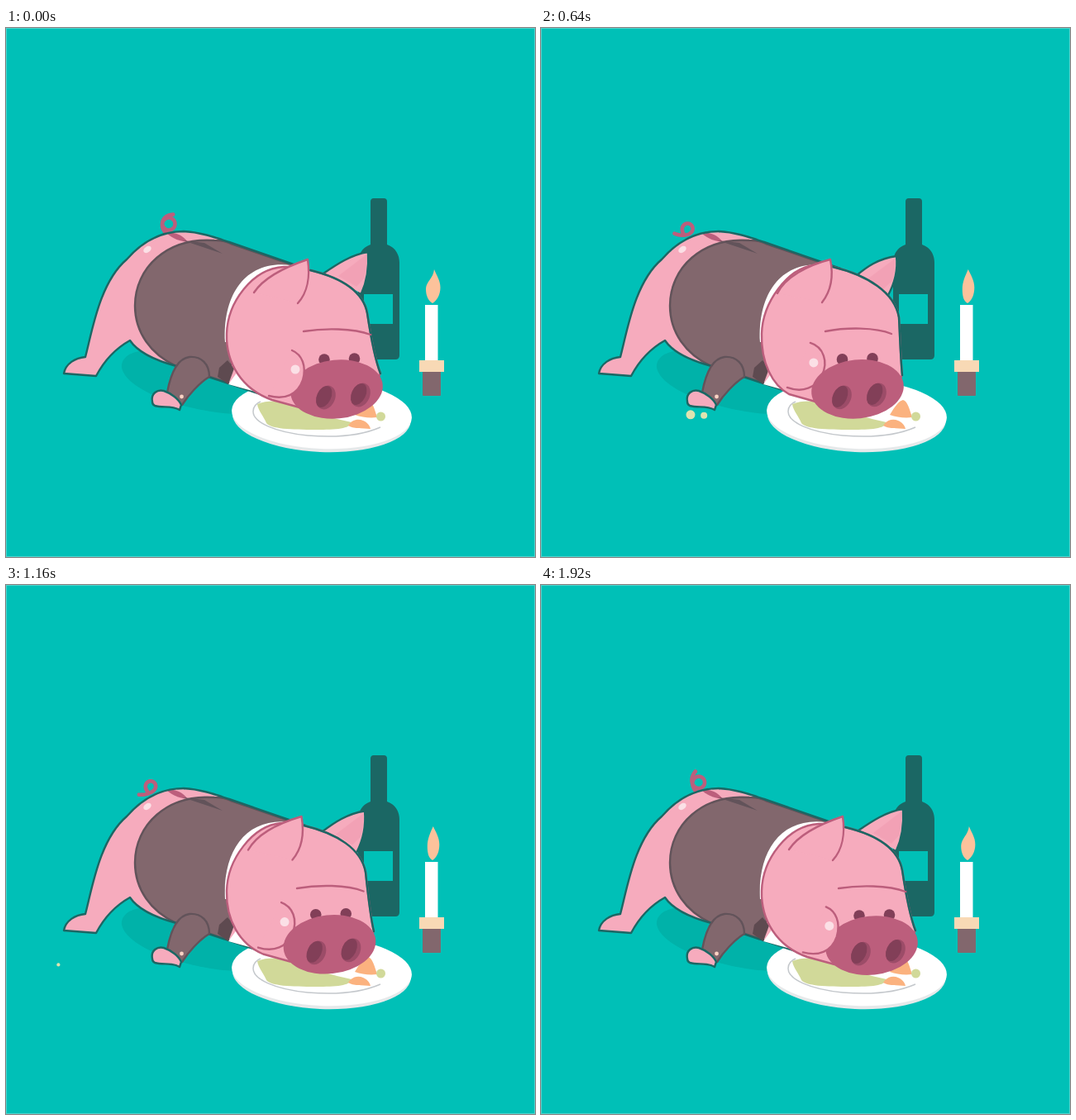
Animation of 640 by 640 pixels, one loop 1.96 s. Source, as an HTML page:

```html
<!DOCTYPE html>
<html lang="en">
<head>
<meta charset="utf-8">
<title>Dinner for one</title>
<style>
  html, body { margin: 0; width: 100%; height: 100%; overflow: hidden; background: #00c0b7; }
  svg { display: block; width: 100vw; height: 100vh; }
  .pink { fill: #f6abbd; }
  .rose { fill: #bc5e7c; }
  .wine { fill: #823f58; }
  .coat { fill: #82676d; }
  .deep { fill: #1b6764; }
  .glow { fill: #fbe0e6; }
  .none { fill: none; }
  .edge, .seam, .blush { stroke-width: 2.4; stroke-linecap: round; stroke-linejoin: round; }
  .edge { stroke: #1b6764; }
  .seam { stroke: #62535a; }
  .blush { stroke: #bc5e7c; }
</style>
</head>
<body>
<svg viewBox="0 0 640 640">
  <rect width="640" height="640" fill="#00c0b7"/>
  <rect x=".5" y=".5" width="639" height="639" fill="none" stroke="#fff" stroke-opacity=".3"/>
  <path fill="#00b2a9" d="M140 411C138 395 160 388 180 390L300 440L276 467C220 464 146 440 140 411Z"/>

  <!-- bottle and candle -->
  <path class="deep" d="M441 210q0-4 4-4h12q4 0 4 4V262C472 266 476 275 476 284V396q0 5-5 5H431q-5 0-5-5V284C426 275 430 266 441 262Z"/>
  <rect x="433" y="322" width="35" height="36" fill="#00c0b7"/>
  <rect x="507" y="335" width="15.5" height="67" fill="#fff"/>
  <rect x="504" y="415" width="22" height="30" rx="1" class="coat"/>
  <rect x="500" y="402" width="30" height="14" fill="#f8d9b5"/>
  <g fill="#fcc29b">
    <path id="flame"/>
    <path id="spark" d="M513 283C516 290 516 294 514 297C511 295 511 290 513 283Z"/>
  </g>

  <!-- plate -->
  <g transform="rotate(2.5 382 467)">
    <ellipse cx="382" cy="471" rx="108" ry="42" fill="#e6e9ea"/>
    <ellipse cx="382" cy="467" rx="109" ry="42" fill="#fff"/>
  </g>
  <path fill="none" stroke="#c4c8cc" stroke-width="1.5" d="M453 483C430 493 400 496 365 493C325 489 299 477 299 464C299 458 303 454 308 452"/>
  <path fill="#d1d999" d="M304 455C318 449 338 451 350 457C370 465 395 472 418 477C416 485 400 486 375 486C345 486 320 485 315 478C312 470 305 463 304 455Z"/>
  <g fill="#fbb27f">
    <path d="M422 468C428 458 433 451 438 450C444 452 446 462 449 471C440 472 430 471 422 468Z"/>
    <path d="M414 481C418 474 426 472 432 475C437 477 440 481 441 485C430 484 420 485 414 481Z"/>
  </g>
  <circle cx="453.5" cy="470" r="5.5" fill="#d1d999"/>

  <!-- body -->
  <path id="tail" fill="none" stroke="#bc5e7c" stroke-width="4.6" stroke-linecap="round" stroke-linejoin="round"/>
  <path id="body" d="M70 418C72 406 84 399 96 398C104 368 113 308 146 280C166 257 190 246 215 246C235 247 252 253 270 259L345 285L362 291L360 440L320 447L206 409C180 402 160 393 150 378C132 388 118 404 109 421Z" fill="#f6abbd"/>
  <path class="rose" d="M194 248C205 247 213 250 220 259C210 258 202 255 194 248Z"/>
  <path class="coat seam" d="M345 286L272 261C266 258 260 257 252 257C195 253 156 290 156 336C156 368 175 395 206 409L265 428L310 300Z"/>
  <path fill="#62535a" d="M214 257L240 260L262 273Z"/>
  <use href="#body" class="edge" style="fill-opacity:0"/>
  <ellipse class="glow" cx="171" cy="268" rx="5.2" ry="3.5" transform="rotate(-35 171 268)"/>
  <path fill="#fff" d="M345 287C290 280 262 322 265 380L300 380L330 300ZM269 431L283 412L305 441Z"/>
  <path fill="#5e4a50" d="M256 422L258 411L268 402L276 412L269 431Z"/>
  <path class="coat seam" d="M195 441C198 425 205 400 222 398C236 397 246 406 246 422C234 429 220 445 213 456"/>
  <path class="pink edge" d="M177 452C175 442 183 437 191 439C200 442 209 449 212 456L210 462C200 456 190 460 180 457C178 456 177 454 177 452Z"/>
  <circle cx="212.5" cy="446" r="2.4" fill="#fbd3c4"/>

  <!-- head: data-a faces right, data-b faces left -->
  <path class="pink edge" data-a="M384 297C400 286 418 274 438 271C439 288 437 306 430 321" data-b="M381 300C394 289 408 279 430 276C432 293 428 309 419 325"/>
  <path fill="#f097ae" opacity=".5" data-a="M402 300L436 274C437 285 436 292 433 303L424 313Z" data-b="M396 303L428 279C429 287 428 294 425 306L414 316Z"/>
  <path class="pink blush" data-a="M355 459L322 450C285 437 266 405 267 370C268 332 298 291 336 289C352 288 360 291 368 293C405 302 432 318 437 345C440 365 446 400 453 418L440 440L390 460Z"
        data-b="M332 452L300 443C280 432 266 405 267 370C268 332 298 291 330 287C338 286 345 287 353 289C395 299 428 320 433 350C434 368 435 400 437 420L425 440L370 460Z"/>
  <path class="none edge" data-a="M368 293C405 302 432 318 437 345C440 365 446 400 453 418" data-b="M353 289C395 299 428 320 433 350C434 368 435 400 437 420"/>
  <path class="pink blush" data-a="M300 320C312 302 335 290 365 280C368 300 365 320 353 333" data-b="M286 321C295 302 322 287 350 280C354 300 351 318 340 332"/>
  <path class="none blush" data-a="M360 367C385 363 420 363 441 371" data-b="M344 367C370 362 405 362 424 370"/>
  <g id="eyes" class="wine">
    <circle cx="385" cy="398" r="6.8"/>
    <circle cx="421.5" cy="397" r="6.8"/>
  </g>
  <g id="face">
    <g id="snout">
      <ellipse class="rose" cx="400" cy="434" rx="56" ry="35.5" transform="rotate(-6 400 434)"/>
      <g id="nose">
        <g transform="translate(387 444) rotate(25)">
          <ellipse rx="11" ry="15" fill="#9c4c68"/><ellipse class="wine" cx="-2.5" rx="8.5" ry="13.8"/>
        </g>
        <g transform="translate(429 441) rotate(25)">
          <ellipse rx="11" ry="15" fill="#9c4c68"/><ellipse class="wine" cx="-2.5" rx="8.5" ry="13.8"/>
        </g>
      </g>
    </g>
    <g id="cheek">
      <path class="pink blush" data-a="M347 389C359 394 365 408 360 425C354 443 338 449 319 444" data-b="M327 380C343 385 349 403 341 419C334 434 318 441 299 434"/>
      <circle id="dot" class="glow" r="5.5"/>
    </g>
  </g>
  <g id="crumbs" fill="#dfe3b0"><circle/><circle/></g>
</svg>
<script>
const LOOP = 1960, STEP = 40;
const WAGS = 4, CHEWS = 9;
const { PI, abs, sin, cos, sqrt, exp } = Math;
const $ = id => document.getElementById(id);
const lerp = (a, b, k) => a + (b - a) * k;
const shift = (el, x, y) => el.setAttribute('transform', `translate(${x} ${y})`);

// Smooth rise from 0 to 1 between two times.
function ramp(t, from, to) {
  const k = Math.min(1, Math.max(0, (t - from) / (to - from)));
  return k * k * (3 - 2 * k);
}

// Blend two paths that hold the same count of numbers.
function mix(a, b, k) {
  const to = b.match(/-?[\d.]+/g);
  let i = 0;
  return a.replace(/-?[\d.]+/g, n => lerp(+n, +to[i++], k).toFixed(2));
}

// A coil that unwinds as it swings from upright (0) to the left (1).
function tailPath(swing) {
  const cx = lerp(197, 173, swing), cy = lerp(237, 244, swing);
  const root = lerp(50, 130, swing), tip = lerp(655, 490, swing);
  const loop = lerp(7.5, 6, swing);
  const points = [];
  for (let k = 0; k <= 1; k += 1 / 64) {
    const angle = lerp(root, tip, k) * PI / 180;
    const reach = k < .5 ? 14 * (1 - swing) : 5 + 7 * swing;
    const r = loop + reach * abs(2 * k - 1) ** 6;
    points.push([cx + r * cos(angle), cy + r * sin(angle)]);
  }
  return 'M' + points.join('L');
}

function flamePath(lean) {
  const tip = 517 + lean, left = 509.5 - 1.5 * lean, right = 524.5 + lean;
  return `M${tip} 292C${tip + 3} ${299 + lean} ${right} 305 ${right} 314` +
    `C${right} 323 521 330 516 333C511 330 ${left} 324 ${left} 316` +
    `C${left} 307 ${tip - 3 + 2 * lean} ${300 + 3 * lean} ${tip} 292Z`;
}

// Crumbs fly left, bounce and shrink; x, speed, height, size and life at launch.
const LAUNCH = 120, GROUND = 470, DRAG = .000087;
const crumbs = [
  { x: 328, speed: .328, height: 69, size: 11, life: 693 },
  { x: 378, speed: .393, height: 40, size: 5.3, life: 1230 }
];
function drawCrumb(el, c, age) {
  const live = age >= 0 && age < c.life;
  el.setAttribute('r', live ? c.size * sqrt(1 - age / c.life) : 0);
  el.setAttribute('cx', c.x - c.speed * age + DRAG * age * age);
  el.setAttribute('cy', GROUND - c.height * exp(-age / 787) * abs(cos(PI * age / 1000)));
}

const turning = [...document.querySelectorAll('[data-a]')];

function draw(t) {
  const phase = 2 * PI * t / LOOP;
  const side = ramp(t, 40, 200) - ramp(t, 1080, 1240);
  const chew = cos(CHEWS * phase);
  const bob = 1.5 + 1.5 * chew;

  for (const el of turning) el.setAttribute('d', mix(el.dataset.a, el.dataset.b, side));
  shift($('eyes'), -20.5 * side, bob);
  shift($('snout'), -17 * side, bob);
  shift($('nose'), -6 * side, 0);
  shift($('cheek'), 2 * chew - 3, chew);
  shift($('dot'), 351 - 20 * side, 412 - 8 * side);

  // The cheek sits over the snout only while facing right.
  const front = side < .5 ? 'cheek' : 'snout';
  if ($('face').lastElementChild.id !== front) $('face').append($(front));

  $('tail').setAttribute('d', tailPath(abs(sin(WAGS * phase / 2))));

  // The flame sways with the tail and calms down halfway through.
  const lean = cos(WAGS * phase) * abs(cos(phase / 2));
  $('flame').setAttribute('d', flamePath(lean));
  $('spark').style.display = lean < -.75 ? '' : 'none';

  crumbs.forEach((c, i) => drawCrumb($('crumbs').children[i], c, t - LAUNCH));
}

let start;
function tick(now) {
  start ??= now;
  draw(Math.floor(((now - start) % LOOP) / STEP) * STEP);
  requestAnimationFrame(tick);
}
draw(0);
requestAnimationFrame(tick);
</script>
</body>
</html>
```
